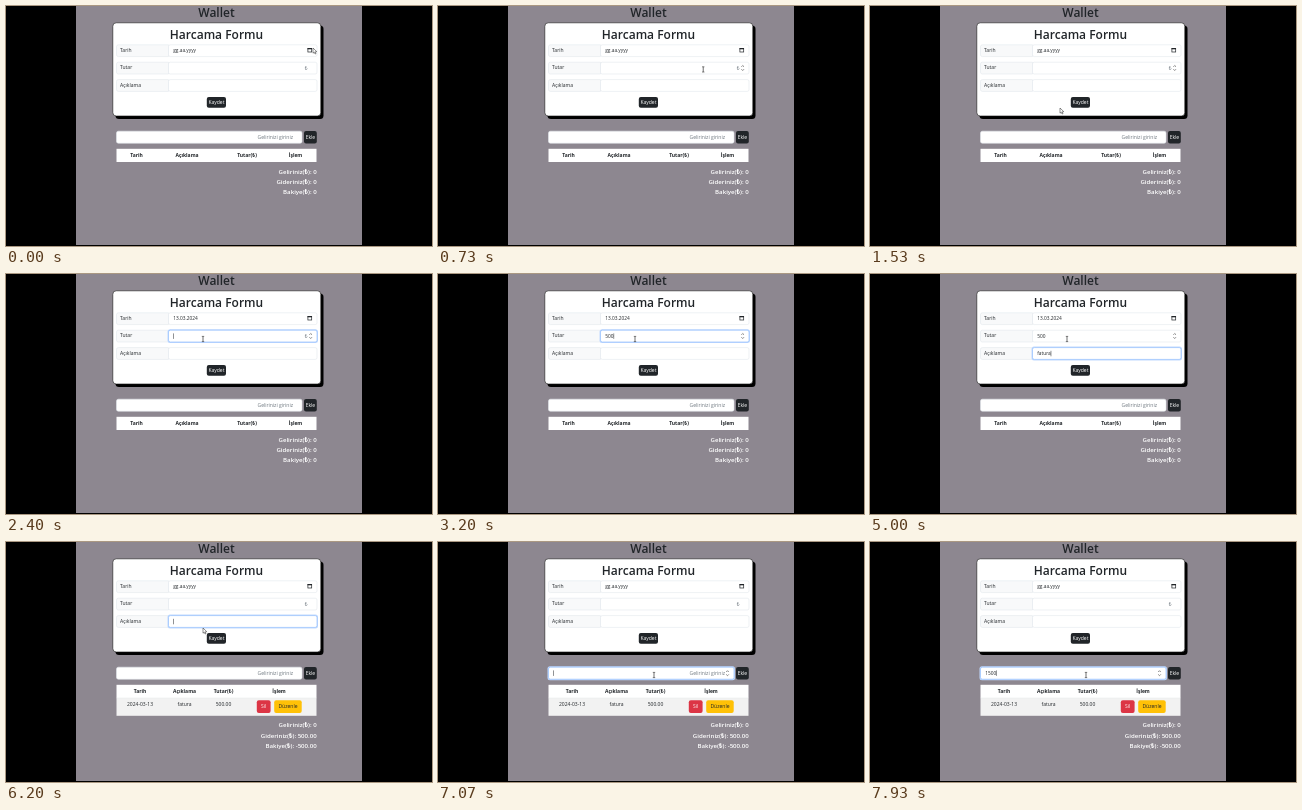
An HTML page with a canvas for the animation above (8 s loop, 426 by 240 pixels).

```html
<!DOCTYPE html>
<html lang="tr">
<head>
<meta charset="utf-8">
<title>Wallet</title>
<style>
  html, body { margin: 0; width: 100%; height: 100%; overflow: hidden; background: #000; }
  canvas { display: block; width: 100vw; height: 100vh; }
</style>
</head>
<body>
<canvas></canvas>
<script>
const LOOP = 8000, STEP = 1000 / 15;
const INK = '#212529', GRAY = '#6c757d', LINE = '#e3e7ec';
const canvas = document.querySelector('canvas');
const ctx = canvas.getContext('2d');
const density = Math.max(1, window.devicePixelRatio || 1);
canvas.width = 426 * density;
canvas.height = 240 * density;
ctx.scale(density, density);

// Moments of the interaction, in ms
const DATE_PICKED = 1670, AMOUNT_FOCUS = 2330, NOTE_FOCUS = 3930;
const SUBMITTED = 5600, INCOME_FOCUS = 6930;
const amountKeys = [2670, 2870, 3070];
const noteKeys = [4270, 4470, 4600, 4730, 4870, 4960];
const incomeKeys = [7330, 7530, 7670, 7800];

// Pointer positions: [time, x, y]
const pointerPath = [
  [0, 307, 42], [350, 307, 42], [1300, 190, 102], [1670, 190, 102],
  [2200, 197, 65], [5100, 197, 65], [5500, 197, 86], [6270, 197, 86], [6870, 216, 133]
];

function box(x, y, w, h, radius, fill, stroke) {
  ctx.beginPath();
  ctx.roundRect(x, y, w, h, radius);
  ctx.fillStyle = fill;
  ctx.fill();
  if (stroke) {
    ctx.strokeStyle = stroke;
    ctx.lineWidth = 0.6;
    ctx.stroke();
  }
}

function text(str, x, y, { size = 5, weight = 400, color = INK, align = 'left' } = {}) {
  ctx.font = `${weight} ${size}px "Open Sans", "Noto Sans", sans-serif`;
  ctx.textAlign = align;
  ctx.fillStyle = color;
  ctx.fillText(str, x, y);
  return ctx.measureText(str).width;
}

const typed = (str, keys, t) => str.slice(0, keys.filter(k => t >= k).length);

function line(color, width, ...points) {
  ctx.beginPath();
  points.forEach(([x, y], i) => i ? ctx.lineTo(x, y) : ctx.moveTo(x, y));
  ctx.strokeStyle = color;
  ctx.lineWidth = width;
  ctx.stroke();
}

function input(x, y, w, h, value, focused) {
  if (focused) box(x - 1, y - 1, w + 2, h + 2, 2.5, '#c2dafe');
  box(x, y, w, h, 1.8, '#fff', focused ? '#86b7fe' : LINE);
  const end = x + 4.7 + text(value, x + 4.7, y + 7.4, { size: 4.8 });
  if (focused) line(INK, 0.5, [end + 0.3, y + 3.2], [end + 0.3, y + 8.7]);
}

function spinner(x, y) {
  line('#555', 0.7, [x - 1.3, y - 1.2], [x, y - 2.5], [x + 1.3, y - 1.2]);
  line('#555', 0.7, [x - 1.3, y + 1.2], [x, y + 2.5], [x + 1.3, y + 1.2]);
}

function label(str, y) {
  box(110.5, y, 52, 11.8, [1.8, 0, 0, 1.8], '#f8f9fa', LINE);
  text(str, 114, y + 7.2);
}

function button(str, x, y, w, h, fill, color) {
  box(x, y, w, h, 2, fill);
  text(str, x + w / 2, y + h / 2 + 1.8, { color, align: 'center' });
}

function calendarIcon() {
  ctx.strokeStyle = INK;
  ctx.lineWidth = 0.7;
  ctx.strokeRect(301.9, 42.4, 3.8, 3.6);
  ctx.fillStyle = INK;
  ctx.fillRect(301.6, 42, 4.4, 1.3);
}

function drawForm(t) {
  const cleared = t >= SUBMITTED;
  const amountFocused = t >= AMOUNT_FOCUS && t < NOTE_FOCUS;
  const noteFocused = t >= NOTE_FOCUS && t < INCOME_FOCUS;
  const amount = cleared ? '' : typed('500', amountKeys, t);
  const note = cleared ? '' : typed('fatura', noteKeys, t);
  const date = t >= DATE_PICKED && !cleared ? '13.03.2024' : 'gg.aa.yyyy';

  box(109.5, 19.5, 208, 93.5, 3.5, '#000');
  box(106.8, 16.8, 208, 93.2, 3.5, '#fff', '#111');
  text('Harcama Formu', 210.5, 33, { size: 12, weight: 600, align: 'center' });

  ['Tarih', 'Tutar', 'Açıklama'].forEach((name, i) => label(name, 38.8 + 17.4 * i));
  input(162.5, 38.8, 148.5, 11.8, date, false);
  calendarIcon();
  input(162.5, 56.2, 148.5, 11.8, amount, amountFocused);
  if (!amount) text('₺', 301.5, 63.6, { size: 4.8, color: GRAY, align: 'right' });
  if (t >= 670 && t < 5170) spinner(304.7, 62);
  input(162.5, 73.6, 148.5, 11.8, note, noteFocused);
  button('Kaydet', 200.8, 91, 19.2, 10.8, INK, '#fff');
}

function drawIncome(t) {
  const income = typed('1500', incomeKeys, t);
  input(110.5, 125.2, 185.5, 12, income, t >= INCOME_FOCUS);
  if (!income) text('Gelirinizi giriniz', 287, 133, { color: GRAY, align: 'right' });
  if (t >= 6800) spinner(289.5, 131.2);
  button('Ekle', 298, 125, 12.8, 12.6, INK, '#fff');
}

function drawTable(t) {
  const saved = t >= SUBMITTED;
  const columns = saved ? [134, 178.5, 217.5, 273] : [130.5, 181, 241, 289.5];
  const center = { align: 'center' };

  ctx.fillStyle = '#fff';
  ctx.fillRect(110.5, 142.8, 200, 13.2);
  ['Tarih', 'Açıklama', 'Tutar(₺)', 'İşlem'].forEach((name, i) =>
    text(name, columns[i], 151, { weight: 700, align: 'center' }));

  if (saved) {
    ctx.fillStyle = '#f2f2f2';
    ctx.fillRect(110.5, 156, 200, 17.8);
    line('#dee2e6', 0.4, [110.5, 156], [310.5, 156]);
    ['2024-03-13', 'fatura', '500.00'].forEach((cell, i) => text(cell, columns[i], 164, center));
    button('Sil', 250.8, 158.3, 13.8, 12.6, '#dc3545', '#fff');
    button('Düzenle', 268.2, 158.3, 27.5, 12.6, '#ffc107', INK);
  }

  const totals = saved
    ? ['Geliriniz(₺): 0', 'Gideriniz(₺): 500.00', 'Bakiye(₺): -500.00']
    : ['Geliriniz(₺): 0', 'Gideriniz(₺): 0', 'Bakiye(₺): 0'];
  totals.forEach((total, i) => text(total, 310.7, (saved ? 185.3 : 167.5) + 10.3 * i,
    { size: 6.1, weight: 600, color: '#fff', align: 'right' }));
}

function pointerAt(t) {
  const next = pointerPath.findIndex(p => p[0] > t);
  if (next < 0) return pointerPath.at(-1).slice(1);
  const [t0, x0, y0] = pointerPath[next - 1], [t1, x1, y1] = pointerPath[next];
  const u = (t - t0) / (t1 - t0), eased = u * u * (3 - 2 * u);
  return [x0 + (x1 - x0) * eased, y0 + (y1 - y0) * eased];
}

function drawPointer(t) {
  const [x, y] = pointerAt(t);
  const overText = x < 296 && (y > 56 && y < 85 || y > 125 && y < 138);
  if (overText) {
    line('#333', 0.7, [x, y - 2.6], [x, y + 2.6]);
    for (const dy of [-2.6, 2.6]) line('#333', 0.6, [x - 1.2, y + dy], [x + 1.2, y + dy]);
    return;
  }
  const shape = [[0, 0], [0, 5.2], [1.2, 4.1], [2.1, 6], [3, 5.6], [2.2, 3.8], [3.8, 3.7]];
  ctx.beginPath();
  shape.forEach(([dx, dy]) => ctx.lineTo(x + dx, y + dy));
  ctx.closePath();
  ctx.fillStyle = '#fff';
  ctx.fill();
  ctx.strokeStyle = '#222';
  ctx.lineWidth = 0.5;
  ctx.stroke();
}

function draw(now) {
  const t = Math.floor((now % LOOP + 4) / STEP) * STEP % LOOP;
  ctx.fillStyle = '#000';
  ctx.fillRect(0, 0, 426, 240);
  ctx.fillStyle = '#8d8790';
  ctx.fillRect(70, 0, 286, 239);
  text('Wallet', 210.5, 11.3, { size: 12, weight: 600, align: 'center' });
  drawForm(t);
  drawIncome(t);
  drawTable(t);
  drawPointer(t);
}

let start;
function tick(now) {
  start ??= now;
  draw(Math.max(0, now - start));
  requestAnimationFrame(tick);
}
requestAnimationFrame(tick);
</script>
</body>
</html>
```
